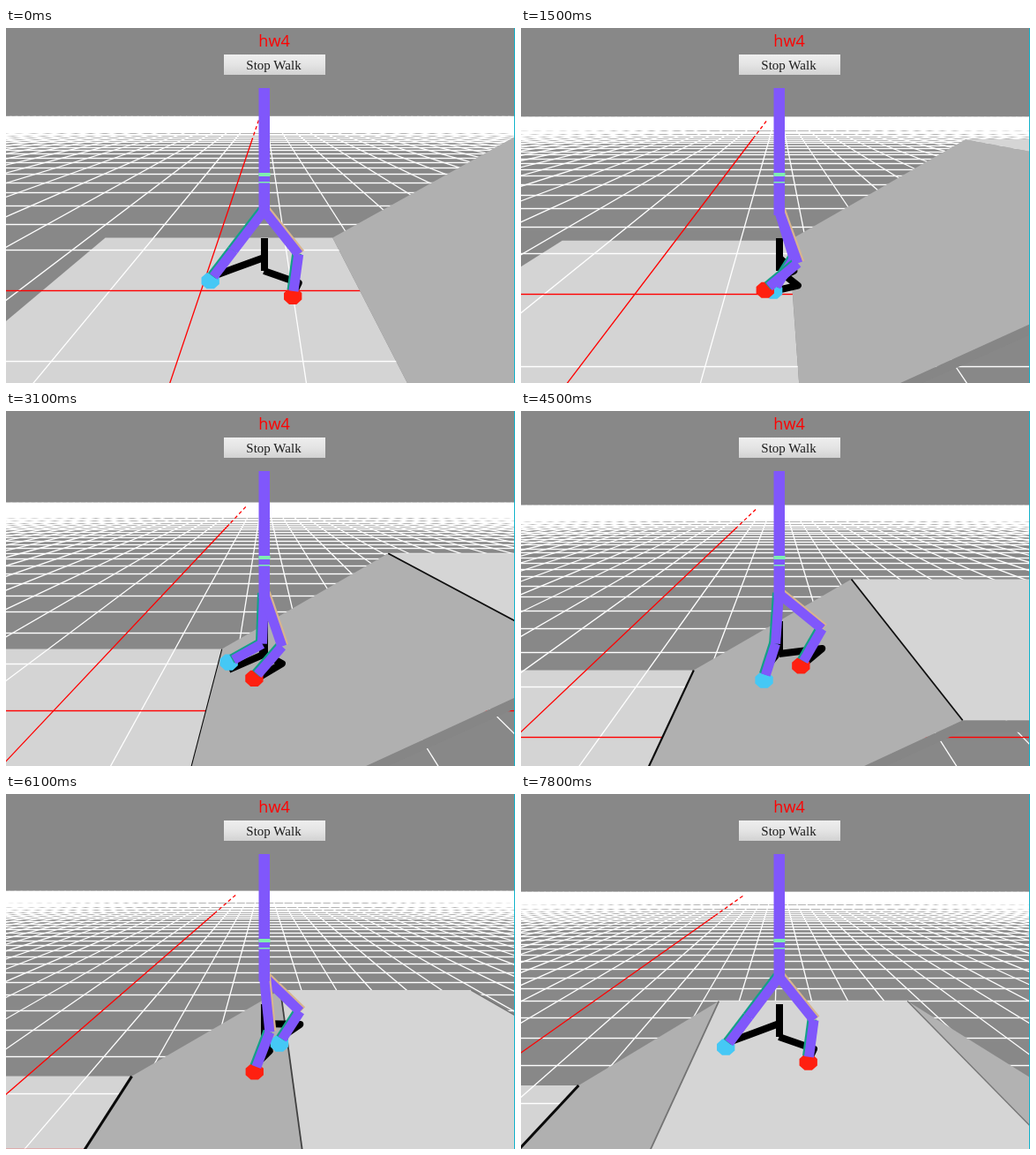
An HTML page with a canvas that plays this animation: 577x402 px, repeating every 7.9 s.

```html
<!DOCTYPE html>
<html lang="en">
<head>
<meta charset="utf-8">
<title>hw4</title>
<style>
  html, body { margin: 0; width: 577px; height: 402px; overflow: hidden; background: #888; }
  body { position: relative; }
  canvas { display: block; }
  .title, .button { position: absolute; text-align: center; white-space: nowrap; }
  .title { left: 204px; top: 2px; width: 200px; color: #f00; font: 18px/25px "Open Sans", "Noto Sans", sans-serif; }
  .button { left: 247px; top: 30px; width: 113px; padding-right: 2px; height: 23px; color: #1c1c1c;
    background: linear-gradient(#eee, #e4e4e4 50%, #d2d2d2); font: 15px/24px "Liberation Serif", serif; }
</style>
</head>
<body>
<canvas id="stage" width="577" height="402"></canvas>
<div class="title">hw4</div>
<div class="button">Stop Walk</div>
<script>
const W = 577, H = 402, LOOP = 7900, STEP = 100;
const ctx = document.getElementById('stage').getContext('2d');

const lerp = (a, b, u) => a + (b - a) * u;
const ramp = (v, a, b) => Math.min(1, Math.max(0, (v - a) / (b - a)));

// Value at time t along a few [time, value] points
function along(points, t) {
  const i = Math.max(1, points.findIndex(p => p[0] >= t));
  const [a, b] = [points[i - 1], points[i]];
  return lerp(a[1], b[1], ramp(t, a[0], b[0]));
}

// Walking pace on the flat, up the slope and on top; then the gait angle in degrees
const TRAVEL = [[0, 0.69], [1.5, 1.59], [6.8, 4.29], [7.9, 5.18]];
const GAIT = [[0, 0], [1.5, 88], [3.1, 286], [4.5, 404], [5.4, 568], [6.8, 628], [7.9, 730]];

// World layout in grid cells
const VX = 292, VY = 86, FOCAL = 375, PITCH = 0.307;
const BACK = 4.44, FRONT = 1.5, AXIS = 3, GRID = 50, THICK = 0.09;
const FLOOR = 1.74, TOP_A = 4.18, TOP_B = 7.06, END = 9.52, RISE = 1.606;
let camX, camH;

function project(x, up, d) {
  const h = camH - up, depth = d + h * PITCH;
  return [VX + FOCAL * (x - camX) / depth, VY + FOCAL * h / depth];
}

function path(points) {
  ctx.beginPath();
  points.forEach(p => ctx.lineTo(...p));
}

function poly(points, color) {
  path(points);
  ctx.fillStyle = color;
  ctx.fill();
}

function line(points, width, color) {
  path(points);
  ctx.lineWidth = width;
  ctx.strokeStyle = color;
  ctx.stroke();
}

function slab(x0, up0, x1, up1, color) {
  const a = project(x0, up0, FRONT), b = project(x1, up1, FRONT);
  poly([a, b, project(x1, up1 - THICK, FRONT), project(x0, up0 - THICK, FRONT)], '#868686');
  poly([project(x0, up0, BACK), project(x1, up1, BACK), b, a], color);
}

function seam(x, up, width, color) {
  if (width > 0) line([project(x, up, BACK), project(x, up, FRONT)], width, color);
}

function column(i, from, to, color) {
  const at = y => [VX + (i - camX) / camH * (y - VY), y];
  line([at(from), at(to)], 1.3, color);
}

function grid() {
  const edge = Math.round(project(0, 0, AXIS + GRID)[1]);
  for (let i = -GRID; i <= GRID; i++) if (i) column(i, edge, H, '#fff');
  for (let n = GRID; n >= -2; n--) {
    const y = Math.round(project(0, 0, AXIS + n)[1]);
    ctx.fillStyle = n ? '#fff' : '#f00';
    ctx.fillRect(-1, y - 0.7, W + 1, 1.4);
  }
  column(0, edge + 24, H, '#f00');
  ctx.setLineDash([4, 3]);
  column(0, edge + 4, edge + 24, '#f00');
  ctx.setLineDash([]);
}

function scene(t) {
  ctx.fillStyle = '#888';
  ctx.fillRect(0, 0, W, H);
  ctx.save();
  ctx.translate(0.5, 0.5);
  slab(-FLOOR, 0, FLOOR, 0, '#d4d4d4');
  grid();
  slab(TOP_B, RISE, END, 0, '#b2b2b2');
  slab(FLOOR, 0, TOP_A, RISE, '#b0b0b0');
  slab(TOP_A, RISE, TOP_B, RISE, '#d5d5d5');
  const g = lerp(15, 115, ramp(t, 5.4, 6.8));
  seam(FLOOR, 0, 3 * ramp(t, 1.7, 5.6), '#0a0a0a');
  seam(TOP_A, RISE, 1.8 * ramp(t, 1.7, 3.1), `rgb(${g},${g},${g})`);
  seam(TOP_B, RISE, 1.5 * ramp(t, 3.1, 5.4), '#777');
  ctx.restore();
}

// Walker
const HIP = [292.5, 207], THIGH = 63, SHIN = 48;
const PURPLE = '#8057fb', TEAL = '#14a088', PEACH = '#d8b48e';
const cosd = deg => Math.cos(deg * Math.PI / 180);
const sind = deg => Math.sin(deg * Math.PI / 180);
const reach = (p, angle, len) => [p[0] + len * sind(angle), p[1] + len * cosd(angle)];

function legJoints(phase, size, slope) {
  const swing = 9 + 38 * cosd(phase) + 17 * cosd(2 * phase - 120);
  const lift = 22 * slope * Math.max(0, cosd(phase));
  const bend = Math.max(0, 40 + 28 * cosd(phase - 20) - 20 * cosd(2 * phase) + lift);
  const knee = reach(HIP, swing, THIGH * size);
  const shin = swing - bend;
  return {
    knee,
    ankle: reach(knee, shin, SHIN * size - 6),
    foot: reach(knee, shin, SHIN * size),
    forward: swing > 0
  };
}

// Flattens a leg onto the ground, tilted with the slope
function legShadow(leg, hipY, slope) {
  const drop = ([x, y]) => [x, hipY + 0.28 * (y - HIP[1]) - 0.35 * slope * (x - HIP[0])];
  line([HIP, leg.knee, leg.foot].map(drop), 8, '#000');
}

function drawFoot([x, y], color) {
  const corners = Array.from({ length: 8 }, (_, i) => {
    const a = 45 * i + 22.5;
    return [x + 11 * cosd(a), y + 9.8 * sind(a)];
  });
  poly(corners, color);
}

function drawLeg({ knee, ankle, foot, forward }, color) {
  const shift = (pts, dx) => pts.map(([x, y]) => [x + dx, y - 1]);
  drawFoot(foot, color);
  line(shift([knee, ankle], -2), 11, TEAL);
  line(shift([HIP, knee], forward ? 2 : -2), 11, forward ? PEACH : TEAL);
  line([knee, ankle], 11, PURPLE);
  line([HIP, knee], 11, PURPLE);
}

function walker(t) {
  const slope = ramp(t, 1.5, 3.5) * (1 - ramp(t, 5.8, 6.8));
  const phase = along(GAIT, t);
  const blue = legJoints(phase + 180, 0.9, slope);
  const red = legJoints(phase, 1, slope);
  ctx.lineJoin = 'round';
  line([[293, 238], [293, 275]], 8, '#000');
  legShadow(blue, 260, slope);
  legShadow(red, 275, slope);
  drawLeg(blue, '#45c8f5');
  drawLeg(red, '#ff2010');
  ctx.fillStyle = PURPLE;
  ctx.fillRect(286.5, 68, 12.5, 144);
  ctx.fillStyle = '#7ff0b0';
  ctx.fillRect(286.5, 164, 13, 4);
  ctx.fillRect(286.5, 174, 12.5, 1.5);
}

function draw(t) {
  camX = along(TRAVEL, t);
  camH = 2.04 + 1.56 * ramp(camX, 1.5, 4.27);
  scene(t);
  walker(t);
  ctx.fillStyle = '#12b4cc';
  ctx.fillRect(W - 1, 0, 1, H);
}

let last = -1;
const start = performance.now();
function tick() {
  const t = Math.floor(((performance.now() - start) % LOOP) / STEP) * STEP;
  if (t !== last) draw((last = t) / 1000);
  requestAnimationFrame(tick);
}
tick();
</script>
</body>
</html>
```
